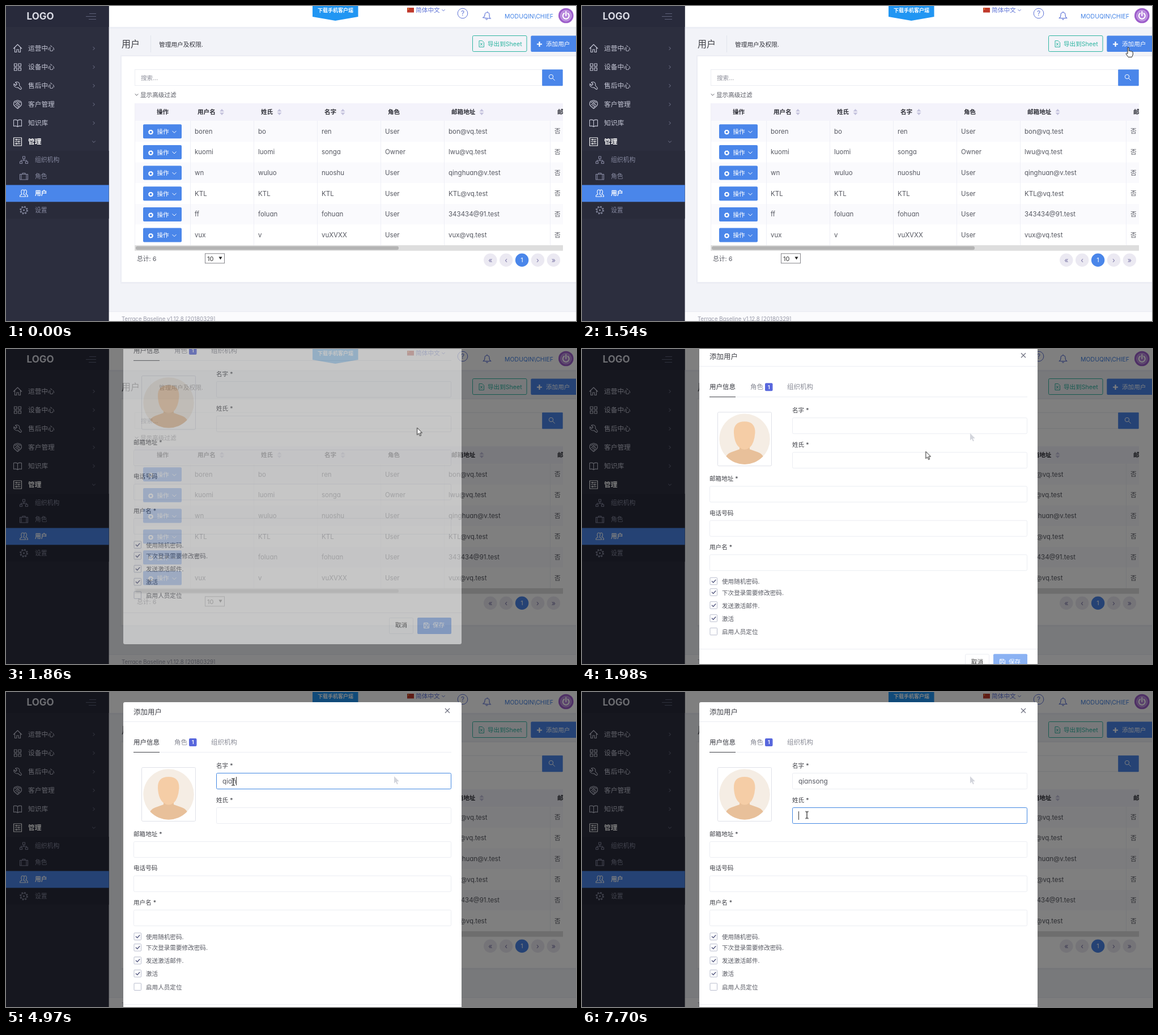
Recreate the animation shown at these times as an HTML page. Size 1006 px wide and 557 px high, loop 8000 ms.

```html
<!DOCTYPE html>
<html lang="zh-CN">
<head>
<meta charset="utf-8">
<title>用户</title>
<style>
html, body { margin: 0; width: 100%; height: 100%; overflow: hidden; background: #f2f3f8; }
svg { display: block; width: 1006px; height: 557px; }
text { font-family: Inter, "Noto Sans CJK SC", "Noto Sans CJK", sans-serif; font-feature-settings: "cv11"; white-space: pre; }
.loop { animation: 8s linear infinite; }
.step { animation: 8s step-end infinite; }

#shade { animation-name: shade; }
@keyframes shade { 0%, 19.8% { opacity: 0 } 20.05%, 100% { opacity: .5 } }

#modal { animation: appear 8s linear infinite, slide 8s linear infinite; }
@keyframes appear { 0%, 22.225% { opacity: 0 } 24.1%, 100% { opacity: 1 } }
@keyframes slide {
  0% { transform: translateY(-147px) }
  22.225% { transform: translateY(-147px); animation-timing-function: ease-out }
  25.975%, 100% { transform: none }
}

#ring { animation-name: ring; }
@keyframes ring { 0% { visibility: visible } 15.6% { visibility: hidden } 52.5% { visibility: visible } 90% { visibility: hidden } }
#rest { animation-name: rest; }
@keyframes rest { 0% { visibility: hidden } 15.6% { visibility: visible } 52.5% { visibility: hidden } 90% { visibility: visible } }
#shake { transform-origin: 849px 17px; animation: shake .1s ease-in infinite alternate; }
@keyframes shake { from { transform: rotate(7deg) } to { transform: rotate(-7deg) } }

#first { animation-name: first; }
@keyframes first { 0%, 36.6% { stroke: #ebedf2 } 38.5%, 94.6% { stroke: #4288e2 } 96%, 100% { stroke: #ebedf2 } }
#last { animation-name: last; }
@keyframes last { 0%, 94.9% { stroke: #ebedf2 } 96.2%, 100% { stroke: #4288e2 } }

#pointer { animation-name: path; }
@keyframes path {
  0%, 7.75% { transform: translate(950px, 526px) }
  10.625% { transform: translate(900px, 85px) }
  12.5% { transform: translate(560px, 60px) }
  14.375% { transform: translate(800px, 50px) }
  15.5% { transform: translate(964px, 72px) }
  20.25% { transform: translate(964px, 73px) }
  23.75% { transform: translate(687px, 150px) }
  24.75% { transform: translate(607px, 181px) }
  27.125% { transform: translate(540px, 222px) }
  29.375% { transform: translate(450px, 236px) }
  32.5% { transform: translate(410px, 200px) }
  34.375% { transform: translate(401px, 164px) }
  36.25%, 80% { transform: translate(401px, 159px) }
  83.125% { transform: translate(400px, 172px) }
  87.5% { transform: translate(397px, 204px) }
  89.375% { transform: translate(397px, 210px) }
  92.25%, 100% { transform: translate(397px, 217.5px) }
}
#arrow { animation-name: arrow; }
@keyframes arrow {
  0%, 15.2%, 25.75%, 33.75%, 87.5%, 100% { opacity: 0 }
  7.75%, 19.8%, 28.5%, 83.125% { opacity: 1 }
}
#hand { animation-name: hand; }
@keyframes hand { 0%, 19.8%, 100% { opacity: 0 } 15.2% { opacity: 1 } }
#beam { animation-name: beam; }
@keyframes beam { 0%, 28.5%, 83.125% { opacity: 0 } 25.75%, 33.75%, 87.5%, 100% { opacity: 1 } }
#trail { animation-name: trail; }
@keyframes trail { 0% { opacity: 0 } 23.9%, 100% { opacity: 1 } }
</style>
</head>
<body>
<svg id="stage" viewBox="0 0 1006 557"></svg>
<script>
const BLUE = '#4a86ea', INK = '#575962', LINE = '#ebedf2';

const text = (x, y, s, size = 10.6, fill = INK, attrs = '') =>
  `<text x="${x}" y="${y}" dy=".36em" font-size="${size}" fill="${fill}" ${attrs}>${s}</text>`;
const rect = (x, y, w, h, fill, attrs = '') =>
  `<rect x="${x}" y="${y}" width="${w}" height="${h}" fill="${fill}" ${attrs}/>`;
const circle = (x, y, r, fill, attrs = '') =>
  `<circle cx="${x}" cy="${y}" r="${r}" fill="${fill}" ${attrs}/>`;
const line = (d, stroke, w = 1, attrs = '') =>
  `<path d="${d}" fill="none" stroke="${stroke}" stroke-width="${w}" ${attrs}/>`;
const at = (x, y, s) => `<g transform="translate(${x} ${y})">${s}</g>`;
const BOLD = 'font-weight="600"', MID = 'text-anchor="middle"';

const down = (x, y, c, r = 3) => line(`M${x - r} ${y - r / 2}l${r} ${r} ${r} ${-r}`, c);
const right = (x, y, c, r = 3) => line(`M${x - r / 2} ${y - r}l${r} ${r} ${-r} ${r}`, c);

const gear = (r, c, w) => circle(0, 0, r * .72, 'none', `stroke="${c}" stroke-width="${w}"`) +
  circle(0, 0, r * .9, 'none', `stroke="${c}" stroke-width="${r * .3}" stroke-dasharray="${r * .35} ${r * .357}"`);

// Line icons, each centred on 0,0
const icons = {
  home: 'M-7.5 .5L0-7 7.5 .5M-5-1.5V6.5H-1.7V2H1.7V6.5H5V-1.5',
  grid: 'M-6-6h4.6v4.6h-4.6zM1.4-6h4.6v4.6h-4.6zM-6 1.4h4.6v4.6h-4.6zM1.4 1.4h4.6v4.6h-4.6z',
  tool: 'M-6.5-3.5L-3.5-.5-1-3-4-6Q0-8 2.5-5 4-3 3-.5L6.5 3.5Q7.5 6 5 6.5L.5 3Q-3 4-5.5 1-7.5-1-6.5-3.5z',
  care: 'M-7-1Q-7-6-2.5-6.5 0-8 2.5-6.5 7-6 7-1 7 2 4 4L0 7.5-4 4Q-7 2-7-1M-4 1L0-3 4 1M-2 3L1 0M0 5L3 2M-5-3Q0-7 5-3',
  book: 'M0-4.5Q-3-6.5-7-5.5V5.5Q-3 4.5 0 6.5 3 4.5 7 5.5V-5.5Q3-6.5 0-4.5V6',
  panel: 'M-7-7H7V7H-7zM-5-3.5H5M-5 0H5M-5 3.5H5M-2-5v3M2-1.5v3M-2 2v3',
  tree: 'M-2-6h4v4h-4zM0-2V2M-5 3V1H5V3M-7 3h4v3.5h-4zM3 3h4v3.5h-4z',
  bag: 'M-7-4H7V5.5H-7zM-2.5-4V-6H2.5V-4M-4.5-4V5.5M4.5-4V5.5',
  people: 'M-7 6Q-7 2.5-3.5 2-5-1-4.5-3.5-4-6.5-1.5-6 1-6 .5-2.5 0 0-.5 2 3 3 3 6zM1-5.5Q4.5-7 5-3 5 0 3.5 1.5 7 2.5 7 6H4.5'
};
const icon = (name, x, y, c) => at(x, y, line(icons[name], c, 1.1, 'stroke-linejoin="round"'));

function sidebar() {
  const c = '#c5c7d6', dim = '#85889f', width = 181.6;
  const menu = [['home', '运营中心'], ['grid', '设备中心'], ['tool', '售后中心'], ['care', '客户管理'], ['book', '知识库'], ['panel', '管理']];
  const sub = [['tree', '组织机构', 272], ['bag', '角色', 301.5], ['people', '用户', 331], ['', '设置', 361]];
  return rect(0, 0, width, 557, '#2c2e3e') + rect(0, 0, width, 37, '#282a3b') + rect(0, 256, width, 120, '#292b3a') +
    text(36.5, 17.5, 'LOGO', 17, '#dcdde6', 'font-weight="700"') +
    line('M147 13.5h12M141 18.5h18M146 23.5h13', '#5f627a') +
    menu.map(([ic, s], i) => {
      const y = 75 + i * 33, on = i === 5;
      return icon(ic, 20.5, y, on ? '#fff' : c) + text(39, y, s, 11.7, on ? '#fff' : c, on ? BOLD : '') +
        (on ? down : right)(155, y, '#74778f', 2.8);
    }).join('') +
    rect(0, 316.5, width, 29.8, BLUE) +
    sub.map(([ic, s, y]) => {
      const k = ic === 'people' ? '#fff' : dim;
      return (ic ? icon(ic, 31.5, y, k) : at(31.5, y, gear(7, k, 1) + circle(0, 0, 1.5, k))) +
        text(51, y, s, 10.8, k, ic === 'people' ? BOLD : '');
    }).join('');
}

function header() {
  const c = '#5d72d6';
  const bell = line('M842.5 21.5H855.5Q853 19.5 853 15.5 853 11.5 849 11.5 845 11.5 845 15.5 845 19.5 842.5 21.5zM849 11.5V9.5M847.3 22.5Q849 26 850.7 22.5', c, 1.1);
  return rect(181, 37, 825, 3, '#eceef5') + rect(181, 0, 825, 37, '#fff') +
    '<path d="M541 0h80.500v19l-40.250 7-40.250-7z" fill="#2196f3"/>' +
    text(581.5, 8, '下载手机客户端', 9, '#fff', `${MID} ${BOLD}`) +
    rect(708, 3, 12, 8.5, '#c0392b') + circle(710.3, 5.3, 1, '#f3c33c') +
    text(723, 7.5, '简体中文', 10.7, c) + down(772, 7.5, c, 2.6) +
    circle(806, 13, 8.8, 'none', `stroke="${c}"`) + text(806, 13, '?', 12, c, MID) +
    `<g id="rest" class="step">${bell}</g><g id="ring" class="step"><g id="shake">${bell}</g></g>` +
    text(966, 18, 'MODUQIN\\CHIEF', 10.5, '#4383e6', 'text-anchor="end"') +
    circle(988.3, 17, 13.3, '#9d5ecb') + circle(988.3, 17, 9.5, '#b583dc', 'stroke="#d3b4ea"') +
    line('M985 13A5.500 5.500 0 1 0 991.600 13M988.300 10V17', '#fff', 2.2, 'stroke-linecap="round"');
}

function toolbar() {
  const teal = '#2fb5a2';
  return text(204, 67, '用户', 16, '#3f4047') + line('M255.5 52V82', '#e2e5ec') +
    text(270, 68, '管理用户及权限.', 10.7, '#33343c') +
    rect(823.5, 52.5, 95.5, 28, 'none', `rx="2" stroke="${teal}"`) +
    line('M835 61.5h5.5l3 3v8h-8.5zM837 65l4 5M841 65l-4 5', teal) +
    text(850, 67, '导出到Sheet', 10.6, teal) +
    rect(926.3, 52.4, 84, 28.6, BLUE, 'rx="2"') + line('M937 67.5h9M941.5 63v9', '#fff', 2.2) +
    text(953, 67.5, '添加用户', 10.6, '#fff');
}

const rows = [
  ['boren', 'bo', 'ren', 'User', 'bon@vq.test'],
  ['kuomi', 'luomi', 'songa', 'Owner', 'lwu@vq.test'],
  ['wn', 'wuluo', 'nuoshu', 'User', 'qinghuan@v.test'],
  ['KTL', 'KTL', 'KTL', 'User', 'KTL@vq.test'],
  ['ff', 'foluan', 'fohuan', 'User', '343434@91.test'],
  ['vux', 'v', 'vuXVXX', 'User', 'vux@vq.test']
];

function table() {
  const cols = [325, 437, 549, 661, 773], all = [...cols, 960];
  const heads = [[266, '操作'], [338, '用户名', 381], [450, '姓氏', 482.5], [562, '名字', 594.5], [674, '角色'], [786, '邮箱地址', 839.5], [973, '邮']];
  const sort = x => `<path d="M${x - 4} 186.5l4-4.5 4 4.5zM${x - 4} 188.5l4 4.5 4-4.5z" fill="#c3c1dc"/>`;
  let s = rect(227, 172, 756, 31, '#f4f3fb') +
    heads.map(([x, h, k]) => text(x, 187.5, h, 10.6, '#2f3038', BOLD) + (k ? sort(k) : '')).join('');
  rows.forEach((r, i) => {
    const y = 221.6 + i * 36.65;
    s += rect(227, y - 18.3, 756, 36.6, i % 2 ? '#fff' : '#fafafd') +
      rect(242, y - 12.3, 68, 25, BLUE, 'rx="2"') + at(255.5, y + 1.5, gear(4.2, '#fff', 2)) +
      text(266.5, y + .5, '操作', 10.6, '#fff') + down(297, y + 1, '#fff', 3.5) +
      r.map((v, j) => text(cols[j] + 8, y, v, 11.5, INK)).join('') + text(968, y, '否', 10.6);
  });
  return `<clipPath id="wide"><rect x="227" y="172" width="756" height="262"/></clipPath><g clip-path="url(#wide)">${s}` +
    line(all.map(x => `M${x + .5} 203V423`).join(''), '#eeeff6') + line('M227.5 172V423', '#f0f0f6') +
    rect(227, 423, 756, 9.8, '#dedede') + rect(229, 424.8, 464, 6.4, '#b4b4b4', 'rx="3"') + '</g>';
}

function card() {
  const pages = ['«', '‹', '1', '›', '»'];
  return rect(202, 87, 806, 404, '#ecedf4') + rect(204, 89, 804, 399, '#fff') +
    rect(227.5, 112.5, 719, 28, '#fff', `stroke="${LINE}"`) + text(238, 127, '搜索...', 10.6, '#8f919c') +
    rect(946.2, 112.3, 36.5, 28.9, BLUE, 'rx="1"') + circle(962, 125, 3.7, 'none', 'stroke="#fff"') + line('M964.7 127.7l4 4', '#fff') +
    down(230.5, 156.8, INK, 2.8) + text(237, 157.3, '显示高级过滤', 10.6) + table() +
    text(231, 446.8, '总计: 6', 10.8) +
    rect(351.5, 437.8, 34, 17, '#fff', 'stroke="#85858a"') + text(355, 447, '10', 11, '#333') +
    '<path d="M375.500 443.500h6l-3 5z" fill="#222"/>' +
    pages.map((p, i) => {
      const x = 854.8 + i * 27.9, on = i === 2;
      return circle(x, 449.2, 11.7, on ? BLUE : '#ebe9f2') + text(x, 449.2, p, on ? 11 : 12.5, on ? '#fff' : '#7a75a5', MID);
    }).join('') +
    rect(181, 541, 825, 16, '#fbfbfd') + line('M181 540.5H1006', '#e9ebf2') +
    text(204, 554, 'Terrace Baseline v1.12.8 [20180329]', 9.7, '#9799a8');
}

function modal() {
  const field = (x, y, label, id) => text(x, y - 13, label, 10.6, '#3f4047') +
    rect(x + .5, y + .5, 785 - x, 28, '#fff', `rx="2" stroke="${LINE}" ${id ? `id="${id}" class="loop"` : ''}`);
  const checks = [['使用随机密码.', 432.5], ['下次登录需要修改密码.', 452], ['发送激活邮件.', 475], ['激活', 498], ['启用人员定位', 521.5]];
  return rect(207, 18, 597, 590, '#fff', 'rx="3"') +
    text(225, 35, '添加用户', 12.5, '#3f4047') + line('M775 29l8 8M783 29l-8 8', '#6f7180', 1.2) +
    line('M207 52.5H804M225 106.5H786M207 552.5H804', LINE) +
    text(225, 88.5, '用户信息', 11.5, '#33343c') + line('M225 106.5h46', '#3f4047') +
    text(297, 88.5, '角色', 11.5, '#8a8c97') + rect(323, 82, 13.5, 14, '#5867dd', 'rx="2"') +
    text(329.7, 89, '1', 9.5, '#fff', `${MID} ${BOLD}`) + text(362, 88.5, '组织机构', 11.5, '#8a8c97') +
    rect(239.5, 133.5, 95, 95, '#fff', 'rx="2" stroke="#dfe1e8"') +
    '<clipPath id="round"><circle cx="287" cy="181" r="44.7"/></clipPath><g clip-path="url(#round)">' +
    rect(240, 134, 94, 94, '#f5ede4') +
    `<path d="M250 228Q251 208 264 204L278 199V188H296V199L310 204Q323 208 324 228z" fill="#e8c09a"/>
     <path d="M268 170Q267 150 287 150 306 150 305.5 170 304 189 296 196 287 203 278 196 269 189 268 170z" fill="#f5cda6"/></g>` +
    field(371, 143, '名字 *', 'first') + field(371, 204, '姓氏 *', 'last') +
    field(225, 264, '邮箱地址 *') + field(225, 324.5, '电话号码') + field(225, 385, '用户名 *') +
    checks.map(([s, y], i) => rect(226, y - 6.5, 12.5, 12.5, '#fff', 'rx="1" stroke="#b9bdce"') +
      (i < 4 ? line(`M229 ${y - .5}l2.7 2.7 4.5-5`, '#5b5f86', 1.5) : '') + text(247, y + .5, s, 10.6)).join('') +
    rect(676.5, 561.5, 42, 28, '#fff', `rx="2" stroke="${LINE}"`) + text(697.5, 574.5, '取消', 10.6, '#333', MID) +
    rect(726, 561, 60, 29, '#8bb2f3', 'rx="2"') +
    line('M737.5 570.5h7l2 2v7h-9zM739.5 570.5v3h4v-3M739.5 579v-3h5v3', '#fff') + text(753, 574.5, '保存', 10.6, '#fff') +
    text(382, 157.5, '', 11.8, INK, 'id="typed"') + rect(382, 150, 1, 15, '#333', 'id="caret"');
}

const ARROW = 'M0 0V12.5L2.9 9.8 4.9 14.3 6.9 13.4 4.9 9H8.8z';
function pointer() {
  return `<path id="trail" class="step" transform="translate(685 149)" d="${ARROW}" fill="#d3d5dc"/>
    <g id="pointer" class="loop">
      <path id="arrow" class="step" d="${ARROW}" fill="#fff" stroke="#222"/>
      <path id="hand" class="step" d="M-1 1Q0-1 1.2 1V7Q3 5.5 4 7.3 5.5 6.3 6.5 8 8.3 7.5 8.3 9.5V13L6.5 17.5H0L-4 11.5Q-3.5 9.5-1 11.5z" fill="#fff" stroke="#222"/>
      <path id="beam" class="step" d="M-3-6H-1L0-5 1-6H3M0-5V5M-3 6H-1L0 5 1 6H3" fill="none" stroke="#222" stroke-width="1.2"/>
    </g>`;
}

document.getElementById('stage').innerHTML =
  rect(0, 0, 1006, 557, '#f2f3f8') + card() + toolbar() + header() + sidebar() +
  rect(0, 0, 1006, 557, '#000', 'id="shade" class="loop"') + `<g id="modal">${modal()}</g>` + pointer();

// Typing and the blinking caret
const WORD = 'qiansong', KEYS = [3800, 4040, 4200, 4560, 5700, 5900, 6050, 6250];
const FOCUS = 2970, NEXT = 7600, BLINK = 530;
const typed = document.getElementById('typed'), caret = document.getElementById('caret');
let start;

function draw(now) {
  start ??= now;
  const t = (now - start) % 8000;
  const n = KEYS.filter(k => k <= t).length;
  const moved = t >= NEXT;
  const since = t - (moved ? NEXT : n ? KEYS[n - 1] : FOCUS);
  const s = WORD.slice(0, n);
  if (typed.textContent !== s) typed.textContent = s;
  caret.setAttribute('x', 382 + (moved || !n ? 0 : Math.round(typed.getComputedTextLength())));
  caret.setAttribute('y', moved ? 211 : 150);
  caret.setAttribute('opacity', since >= 0 && since % (2 * BLINK) < BLINK ? 1 : 0);
  requestAnimationFrame(draw);
}
requestAnimationFrame(draw);
</script>
</body>
</html>
```
